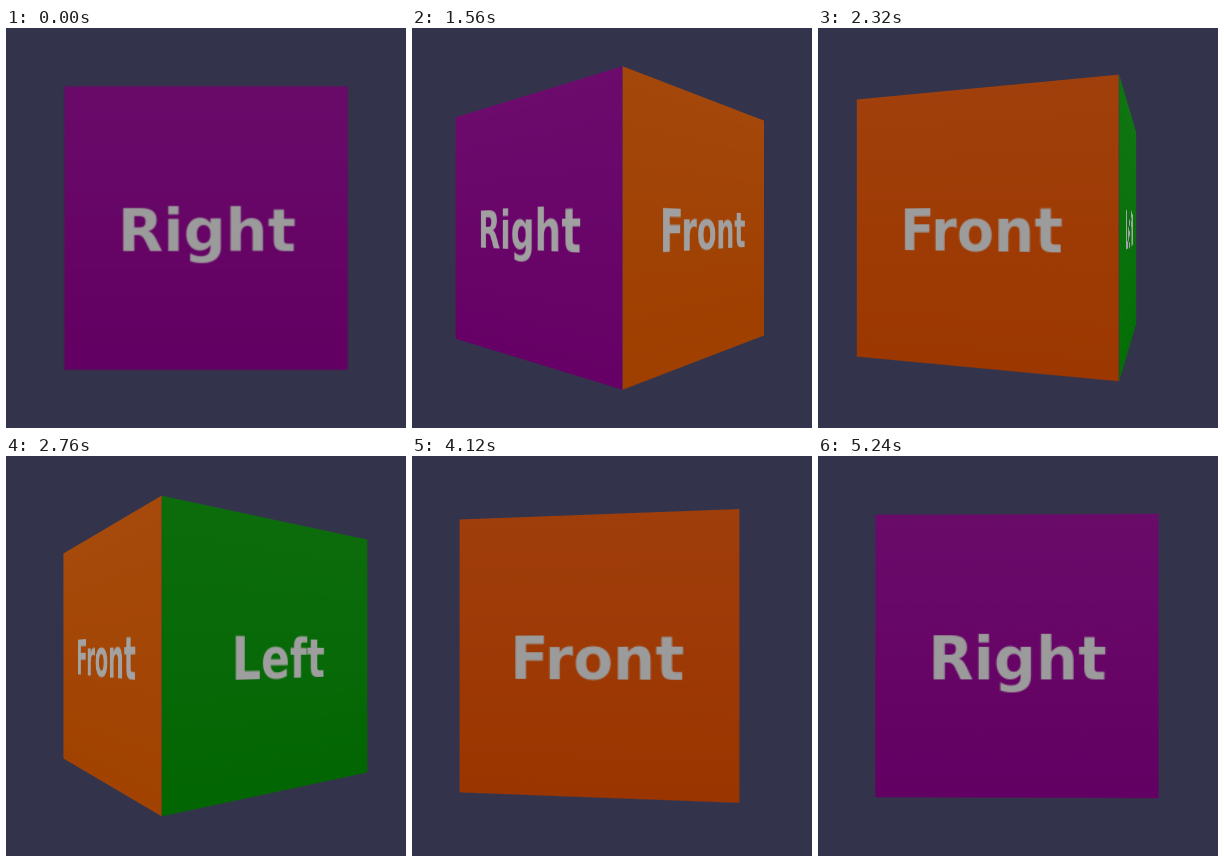
Write an HTML page that moves like this. It is 400 px wide and 400 px high and loops after 5280 ms.

```html
<!DOCTYPE html>
<html lang="en">
<head>
<meta charset="utf-8">
<title>Turning cube</title>
<style>
  html, body { margin: 0; width: 100%; height: 100%; overflow: hidden; background: #33334c; }
  #stage { position: relative; width: 400px; height: 400px; overflow: hidden; perspective: 473.04px; }
  #cube { position: absolute; left: 200px; top: 200px; width: 0; height: 0; transform-style: preserve-3d; }
  .face {
    --s: 218.3px;
    position: absolute; left: calc(var(--s) / -2); top: calc(var(--s) / -2);
    width: var(--s); height: var(--s);
    backface-visibility: hidden;
    background-image: linear-gradient(rgba(255, 255, 255, .045), transparent);
    font: bold 45.4px/223.8px "DejaVu Sans", Verdana, sans-serif;
    text-align: center; text-indent: 1.2px; white-space: nowrap;
  }
</style>
</head>
<body>
<div id="stage"><div id="cube"></div></div>
<script>
const LOOP = 5280, STEP = 40, HALF = 109.15;

// Time in ms, turn in degrees; linear in between.
const KEYS = [
  [0, 0], [1072, 0], [1560, 42.4], [2320, 107.2], [2760, 146.2],
  [3158, 180], [3520, 149], [4120, 97.1], [5247, 0], [LOOP, 0]
];

// Colours facing the viewer and seen edge-on.
const FACES = [
  { label: "Right", near: [99, 0, 99], far: [105, 0, 105] },
  { label: "Front", near: [155, 53, 0], far: [163, 72, 0] },
  { label: "Left", near: [0, 97, 0], far: [6, 112, 8] }
];
const TEXT = { near: [155, 155, 155], far: [165, 165, 165] };

const cube = document.getElementById("cube");
FACES.forEach((face, i) => {
  face.el = document.createElement("div");
  face.el.className = "face";
  face.el.textContent = face.label;
  face.el.style.transform = `rotateY(${i * 90}deg) translateZ(${HALF}px)`;
  cube.append(face.el);
});

function turnAt(t) {
  const i = KEYS.findIndex(key => t < key[0]);
  const [t0, a0] = KEYS[i - 1], [t1, a1] = KEYS[i];
  return a0 + (a1 - a0) * (t - t0) / (t1 - t0);
}

function blend({ near, far }, k) {
  return `rgb(${near.map((v, i) => Math.round(v + (far[i] - v) * k)).join(",")})`;
}

function draw(now) {
  const t = Math.floor((now % LOOP) / STEP) * STEP;
  const turn = turnAt(t);
  cube.style.transform = `rotateY(${-turn}deg)`;
  FACES.forEach((face, i) => {
    const tilt = Math.sin((turn - i * 90) * Math.PI / 180) ** 2;
    face.el.style.backgroundColor = blend(face, tilt);
    face.el.style.color = blend(TEXT, tilt);
  });
}

const start = performance.now();
function tick() {
  draw(performance.now() - start);
  requestAnimationFrame(tick);
}
tick();
</script>
</body>
</html>
```
